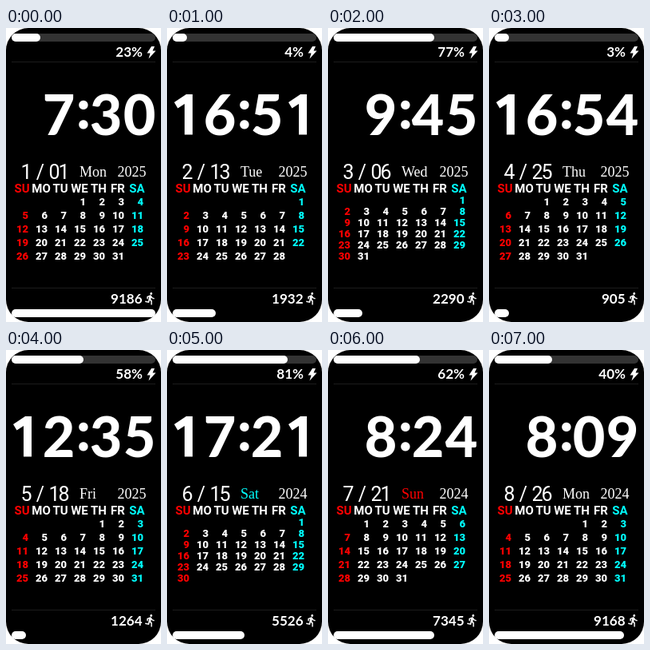
These frames come from a looping animation (194x368 px, 8 s). An HTML page with a canvas:

```html
<!DOCTYPE html>
<html lang="en">
<head>
<meta charset="utf-8">
<title>Watch face</title>
<style>
  html, body { margin: 0; width: 194px; height: 368px; overflow: hidden; background: #fff; }
  canvas { display: block; }
</style>
</head>
<body>
<canvas width="194" height="368"></canvas>
<script>
const ctx = document.querySelector('canvas').getContext('2d');
const WHITE = '#fff', RED = '#f00', CYAN = '#0ff', TRACK = '#333', LINE = '#1c1c1c';
const STEP_MS = 1000;

// time, battery, steps, step bar (tenths), month, day, weekday, year, days in month
const STATES = [
  ['7:30', 23, 9186, 10, 1, '01', 'Mon', 2025, 31],
  ['16:51', 4, 1932, 3, 2, '13', 'Tue', 2025, 28],
  ['9:45', 77, 2290, 2, 3, '06', 'Wed', 2025, 31],
  ['16:54', 3, 905, 1, 4, '25', 'Thu', 2025, 31],
  ['12:35', 58, 1264, 1, 5, '18', 'Fri', 2025, 31],
  ['17:21', 81, 5526, 5, 6, '15', 'Sat', 2024, 30],
  ['8:24', 62, 7345, 7, 7, '21', 'Sun', 2024, 31],
  ['8:09', 40, 9168, 9, 8, '26', 'Mon', 2024, 31],
];

const BOLT = new Path2D('M182 23H186L183.5 28.5H187.5L178.5 38.5L180.5 31.5H176.5Z');
const RUNNER = new Path2D('M13.49 5.48c1.1 0 2-.9 2-2s-.9-2-2-2-2 .9-2 2 .9 2 2 2zm-3.6 13.9l1-4.4 2.1 2v6h2v-7.5l-2.1-2 .6-3c1.3 1.5 3.3 2.5 5.5 2.5v-2c-1.9 0-3.5-1-4.3-2.4l-1-1.6c-.4-.6-1-1-1.7-1-.3 0-.5.1-.8.1l-5.2 2.2v4.7h2v-3.4l1.8-.7-1.6 8.1-4.9-1-.4 2 7 1.4z');
// A "1" without a foot, relative to its cell centre and baseline
const BARE_ONE = new Path2D('M8 -50.5V0H-2V-38.5L-10.5 -33L-15 -40.5L0 -50.5Z');

function text(value, x, y, font, align = 'left', color = WHITE) {
  ctx.font = font;
  ctx.textAlign = align;
  ctx.fillStyle = color;
  ctx.fillText(value, x, y);
}

function pill(x, y, w, h, r, color) {
  ctx.fillStyle = color;
  ctx.beginPath();
  ctx.roundRect(x, y, w, h, r);
  ctx.fill();
}

function fillAt(path, x, y, scale = 1) {
  ctx.save();
  ctx.translate(x, y);
  ctx.scale(scale, scale);
  ctx.fillStyle = WHITE;
  ctx.fill(path);
  ctx.restore();
}

const bar = (y, tenths, color = WHITE) => pill(7, y, tenths * 18, 10, 5, color);
const columnColor = col => col === 0 ? RED : col === 6 ? CYAN : WHITE;

function drawClock(time) {
  const font = '800 70px Lato, sans-serif', baseline = 133.5;
  const centers = [24, 66, 97, 125, 167];
  [...time.padStart(5)].forEach((char, i) => {
    if (char === '1') fillAt(BARE_ONE, centers[i], baseline);
    else text(char, centers[i], char === ':' ? 126 : baseline, font, 'center');
  });
}

function drawDate(month, day, weekday, year) {
  [[month, 25.5], ['/', 43], [day[0], 60.5], [day[1], 72.5]].forEach(([char, x]) =>
    text(char, x, 189, '400 25px Roboto, sans-serif', 'center'));
  const serif = '18px "Liberation Serif", serif';
  text(weekday, 92, 186, serif, 'left', columnColor({ Sun: 0, Sat: 6 }[weekday]));
  text(year, 139.5, 186, serif);
}

function drawCalendar(month, year, days) {
  ['SU', 'MO', 'TU', 'WE', 'TH', 'FR', 'SA'].forEach((name, col) =>
    text(name, 20 + col * 24, 206, '700 15px Roboto, sans-serif', 'center', columnColor(col)));
  const first = new Date(year, month - 1, 1).getDay();
  const sixRows = first + days > 35;
  for (let day = 1; day <= days; day++) {
    const cell = first + day - 1, col = cell % 7, row = Math.floor(cell / 7);
    const y = sixRows ? 219.5 + row * 14 : 221.5 + row * 17;
    text(day, 28 + col * 24, y, '900 13px Roboto, sans-serif', 'right', columnColor(col));
  }
}

function draw([time, battery, steps, stepTenths, month, day, weekday, year, days]) {
  ctx.clearRect(0, 0, 194, 368);
  pill(0, 0, 194, 368, 28, '#000');
  bar(7, 10, TRACK);
  bar(7, Math.max(1, Math.floor(battery / 10)));
  bar(352, stepTenths);
  ctx.fillStyle = LINE;
  ctx.fillRect(7, 42, 180, 1);
  ctx.fillRect(7, 325, 180, 1);

  const small = '700 17px Lato, sans-serif';
  text(battery + '%', 171, 36, small, 'right');
  text(steps, 170.5, 344.5, small, 'right');
  fillAt(BOLT, 0, 0);
  fillAt(RUNNER, 172, 330, 0.72);

  drawClock(time);
  drawDate(month, day, weekday, year);
  drawCalendar(month, year, days);
}

function frame() {
  draw(STATES[Math.floor(performance.now() / STEP_MS) % STATES.length]);
  requestAnimationFrame(frame);
}
frame();
</script>
</body>
</html>
```
